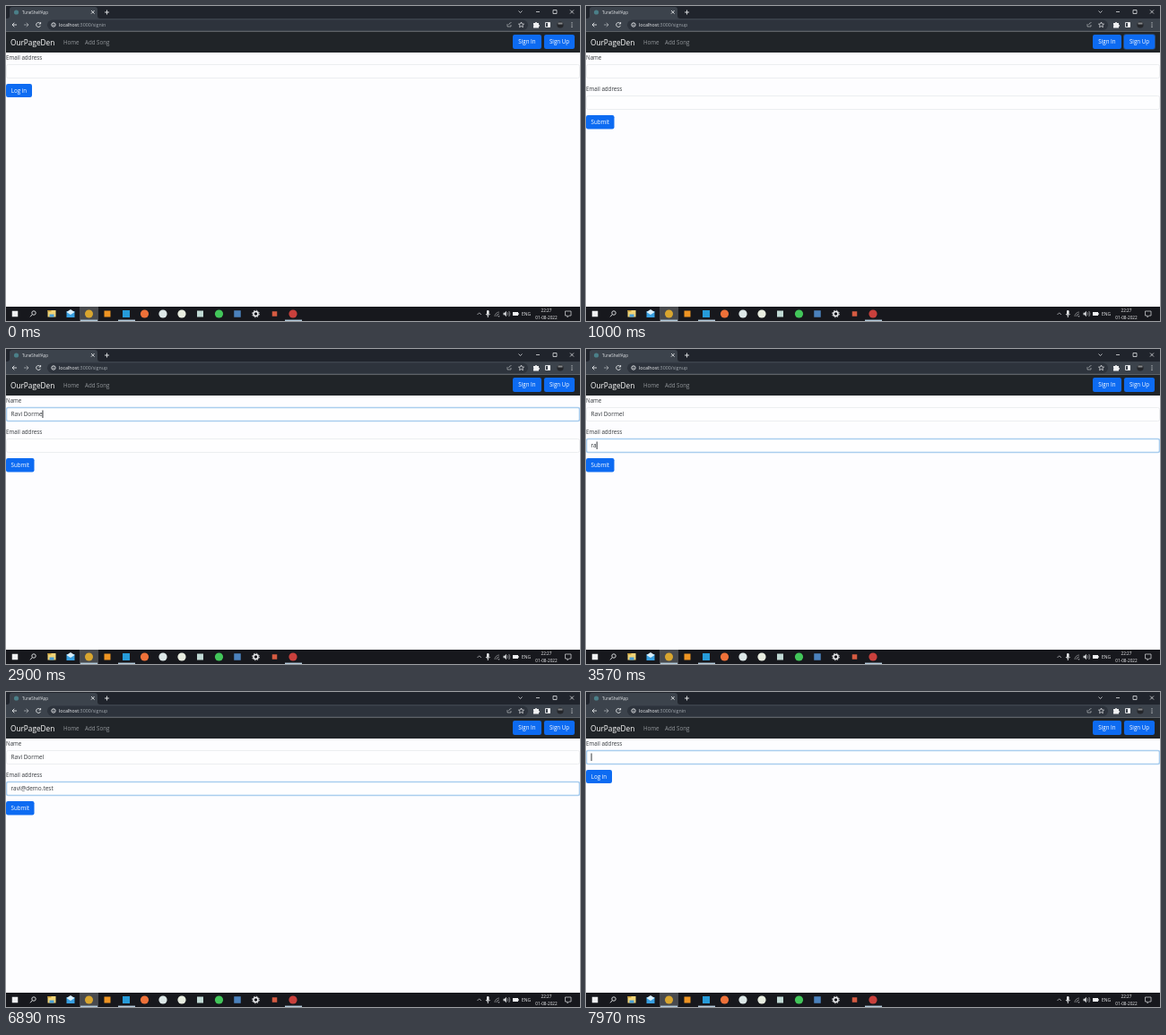
An HTML page that plays this animation: 640x352 px, repeating every 8000 ms.

```html
<!DOCTYPE html>
<html lang="en">
<head>
<meta charset="utf-8">
<title>Sign-up form</title>
<style>
  html, body { margin: 0; width: 100%; height: 100%; overflow: hidden; background: #fdfdff; }
  svg { display: block; width: 100vw; height: 100vh; }
  text { font: 6.2px "Open Sans", "Noto Sans", sans-serif; white-space: pre; }
  .line { fill: none; stroke: #e6e8ea; stroke-width: .9; }
  .label { fill: #34383c; }
  .value { font-size: 6.45px; }
  .tiny { font-size: 5px; }
  .clock { font-size: 4.7px; text-anchor: middle; }
</style>
</head>
<body>
<svg id="stage" viewBox="0 0 640 352" preserveAspectRatio="none"></svg>
<script>
const LOOP = 8000;
const NAME = "Ravi Dormel";
const EMAIL = "ravi@demo.test";
const NAME_KEYS = [1410, 1660, 1740, 1910, 2080, 2240, 2410, 2490, 2660, 2820, 2990];
const EMAIL_KEYS = [3400, 3490, 3740, 3990, 4400, 4730, 5060, 5230, 5480, 5480, 5730, 5890, 6060, 6220];
const SIGNUP_FROM = 250, SIGNUP_TO = 7260;
const HOVER_FROM = 80, HOVER_TO = 1000;
const NAME_FOCUS = 1160, EMAIL_FOCUS = 3240, LOGIN_FOCUS = 7550;
const BLUE = "#0d6bf2", BLUE_HOVER = "#0c5cce";
const BORDER = "#eceef0", BORDER_FOCUS = "#a9cdee";
const INK = "#34383c", LIGHT = "#f0f1f3", MUTED = "#92969a";

const rect = (x, y, w, h, fill, more = "") =>
  `<rect x="${x}" y="${y}" width="${w}" height="${h}" fill="${fill}" ${more}/>`;
const dot = (x, y, r, fill) => `<circle cx="${x}" cy="${y}" r="${r}" fill="${fill}"/>`;
const ring = (x, y, r) => `<circle class="line" cx="${x}" cy="${y}" r="${r}"/>`;
const text = (x, y, words, fill, more = "") => `<text x="${x}" y="${y}" fill="${fill}" ${more}>${words}</text>`;
const line = (d, more = "") => `<path class="line" d="${d}" ${more}/>`;
const label = (y, words) => text(0, y, words, INK, 'class="label"');
const button = (x, y, w, h, words, id = "") =>
  rect(x, y, w, h, BLUE, `rx="2.2" id="${id}"`) +
  text(x + w / 2, y + h / 2 + 2.4, words, "#fff", 'text-anchor="middle"');
const field = (id, y) =>
  rect(.5, y + .5, 639, 15, "#fefeff", `rx="2" id="${id}Box"`) +
  text(5.6, y + 10.2, "", INK, `class="value" id="${id}Text"`) +
  rect(0, y + 3.5, .9, 8.5, "#202428", `id="${id}Caret"`);

function browser() {
  return rect(0, 0, 640, 14, "#20242c") +
    `<path fill="#3c434c" d="M1 14Q4 14 4 11V4Q4 1 7 1H99Q102 1 102 4V11Q102 14 105 14Z"/>` +
    dot(11.5, 7, 2.6, "#4b7f88") +
    text(18, 8.8, "TuneShelfApp", "#e0e3e6", 'style="font-size:4.5px"') +
    line("M95 5l3.6 3.6M98.6 5l-3.6 3.6M110 7h5M112.5 4.5v5") +
    line("M571.5 5.5l2 2 2-2M591 6.5h4M610 4.5h4v4h-4zM629 4.5l4 4m0-4l-4 4", 'opacity=".85"') +
    rect(0, 14, 640, 14.5, "#3c434c") +
    rect(46, 15.5, 536, 11.5, "#2d333c", 'rx="5.7"') +
    line("M12 21H7m2.3-2.3L7 21l2.3 2.3") +
    line("M20 21h5m-2.3-2.3L25 21l-2.3 2.3", 'opacity=".55"') +
    line("M38.3 19.6a2.5 2.5 0 1 0 .2 2.3M38.6 18v2h-2") +
    ring(53, 21, 2.2) + line("M53 20.7v1.5M53 19.5v.5") +
    text(59, 22.9, 'localhost<tspan fill="#a2a8ae">:3000/<tspan id="route"></tspan></tspan>',
      LIGHT, 'style="font-size:5.3px"') +
    line("M559 20v3h4v-2M560.5 21q1-2.5 3-2.5", 'opacity=".55"') +
    line("M574.5 18l.9 2 2.1.2-1.6 1.4.5 2.1-1.9-1.1-1.9 1.1.5-2.1-1.6-1.4 2.1-.2z", 'opacity=".8"') +
    `<path fill="${LIGHT}" d="M588 19h2a1 1 0 0 1 2 0h2v2a1 1 0 0 1 0 2v1.5h-6v-2a1 1 0 0 0 0-1.5z"/>` +
    line("M601.5 18.5h5v5h-5z") + rect(604, 18.5, 2.7, 5, LIGHT) +
    dot(618, 21, 3.6, "#24262a") + rect(615.5, 18.5, 5, 2, "#85878a") +
    [18.8, 21, 23.2].map(y => dot(631, y, .6, LIGHT)).join("");
}

function navbar() {
  return rect(0, 28.5, 640, 23.5, "#202428") +
    text(5, 43.8, "OurPageDen", "#fff", 'style="font-size:8.25px"') +
    text(64, 43, "Home", MUTED) + text(88, 43, "Add Song", MUTED) +
    rect(599, 31.3, 36, 17.4, "#284c7c", 'rx="3" id="ring"') +
    button(565, 32, 32, 16, "Sign In") + button(600, 32, 34, 16, "Sign Up", "signUp");
}

function pages() {
  return `<g id="signinPage">` + label(59.5, "Email address") +
    field("login", 65) + button(0, 87, 29, 15, "Log in") + `</g>
    <g id="signupPage">` + label(59.5, "Name") + field("name", 65) +
    label(94.5, "Email address") + field("email", 100) +
    button(0, 122, 31.5, 15.5, "Submit") + `</g>
    <g id="status">` + rect(0, 327, 213, 9, "#252930") +
    text(2, 333.3, "localhost:3000/signup", "#e6e8ea", 'class="tiny"') + `</g>`;
}

function taskbar() {
  const y = 344;
  const square = (x, size, fill) => rect(x - size / 2, y - size / 2, size, size, fill);
  return rect(0, 336, 640, 16, "#17181d") +
    rect(82, 336, 21, 16, "#484a4e") +
    [82, 124, 310].map(x => rect(x + 1, 350.6, 19, 1.4, "#b4cbdc")).join("") +
    square(10, 6.5, LIGHT) +
    ring(31, 343, 2.2) + line("M29.3 344.7l-2.3 2.6") +
    rect(46.5, 340, 9, 7.5, "#f0d477") + rect(46.5, 340, 4, 1.5, "#c99b35") + rect(48.5, 344.5, 5, 3, "#4ba0d8") +
    rect(67.5, 341, 9, 7, "#38a0e2") + `<path d="M67.5 342l4.5-3 4.500 3-4.500 3z" fill="#d9effa"/>` +
    dot(92.5, y, 4.5, "#d9a62f") +
    square(113, 7, "#ee9423") + square(134, 8, "#269bd9") +
    dot(154.5, y, 4.6, "#ee7139") + dot(175, y, 4.6, "#dde8e8") + dot(196, y, 4.6, "#e8ede0") +
    square(216.5, 7, "#c0d9d4") + dot(237.5, y, 4.6, "#42c65a") + square(258, 7.5, "#4b82bd") +
    `<circle cx="278.5" cy="${y}" r="2.5" fill="none" stroke="${LIGHT}" stroke-width="1.5"/>` +
    `<circle cx="278.5" cy="${y}" r="3.8" fill="none" stroke="${LIGHT}" stroke-dasharray="1.5 1.484"/>` +
    square(299.5, 5.5, "#d65b42") + dot(320, y, 4.6, "#c9403c") +
    line("M525.5 345l2.2-2.2 2.2 2.2", 'opacity=".7"') +
    rect(536, 340, 2.6, 5, LIGHT, 'rx="1.3"') + line("M535 344q2.3 3.5 4.6 0M537.3 346v2") +
    line("M545 347a5 5 0 0 1 5-5M547 347a3 3 0 0 1 3-3", 'opacity=".5"') + dot(549.5, 346.7, .8, "#a5a8ac") +
    `<path fill="#c8cacd" d="M554.5 342.8h1.5l2-2v6.4l-2-2h-1.5z"/>` +
    line("M559.3 342.3q1.2 1.7 0 3.4M560.8 341q2.2 3 0 6", 'opacity=".6"') +
    rect(565, 342, 6, 4, LIGHT) + rect(571, 343.2, .8, 1.6, LIGHT) +
    text(575, 346, "ENG", LIGHT, 'class="tiny"') +
    text(602.5, 342.2, "22:27", LIGHT, 'class="clock"') +
    text(602.5, 349.5, "01-08-2022", LIGHT, 'class="clock"') +
    line("M623.5 341h6.5v5h-2.5l-1.5 1.8v-1.8h-2.5z", 'opacity=".75"');
}

const stage = document.getElementById("stage");
stage.innerHTML = rect(0, 0, 640, 352, "#fdfdff") + pages() + browser() + navbar() + taskbar();
const $ = id => document.getElementById(id);
const show = (id, on) => $(id).setAttribute("visibility", on ? "inherit" : "hidden");

function drawField(id, t, value, keys, from, to) {
  const focused = t >= from && t < to;
  const pressed = keys.filter(time => time <= t);
  const lastInput = Math.max(from, ...pressed);
  const typed = $(id + "Text");
  typed.textContent = value.slice(0, pressed.length);
  $(id + "Box").setAttribute("stroke", focused ? BORDER_FOCUS : BORDER);
  $(id + "Box").setAttribute("stroke-width", focused ? 1.6 : 1);
  $(id + "Caret").setAttribute("x", 5.6 + (pressed.length ? typed.getComputedTextLength() : 0));
  show(id + "Caret", focused && (t - lastInput) % 1000 < 500);
}

function draw(t) {
  const signup = t >= SIGNUP_FROM && t < SIGNUP_TO;
  const hover = t >= HOVER_FROM && t < HOVER_TO;
  show("signupPage", signup);
  show("signinPage", !signup);
  show("status", hover);
  show("ring", t >= SIGNUP_FROM && t < NAME_FOCUS);
  $("signUp").setAttribute("fill", hover ? BLUE_HOVER : BLUE);
  $("route").textContent = signup ? "signup" : "signin";
  drawField("name", t, NAME, NAME_KEYS, NAME_FOCUS, EMAIL_FOCUS);
  drawField("email", t, EMAIL, EMAIL_KEYS, EMAIL_FOCUS, SIGNUP_TO);
  drawField("login", t, "", [], LOGIN_FOCUS, LOOP);
}

const start = performance.now();
function frame() {
  draw((performance.now() - start) % LOOP);
  requestAnimationFrame(frame);
}
frame();
</script>
</body>
</html>
```
